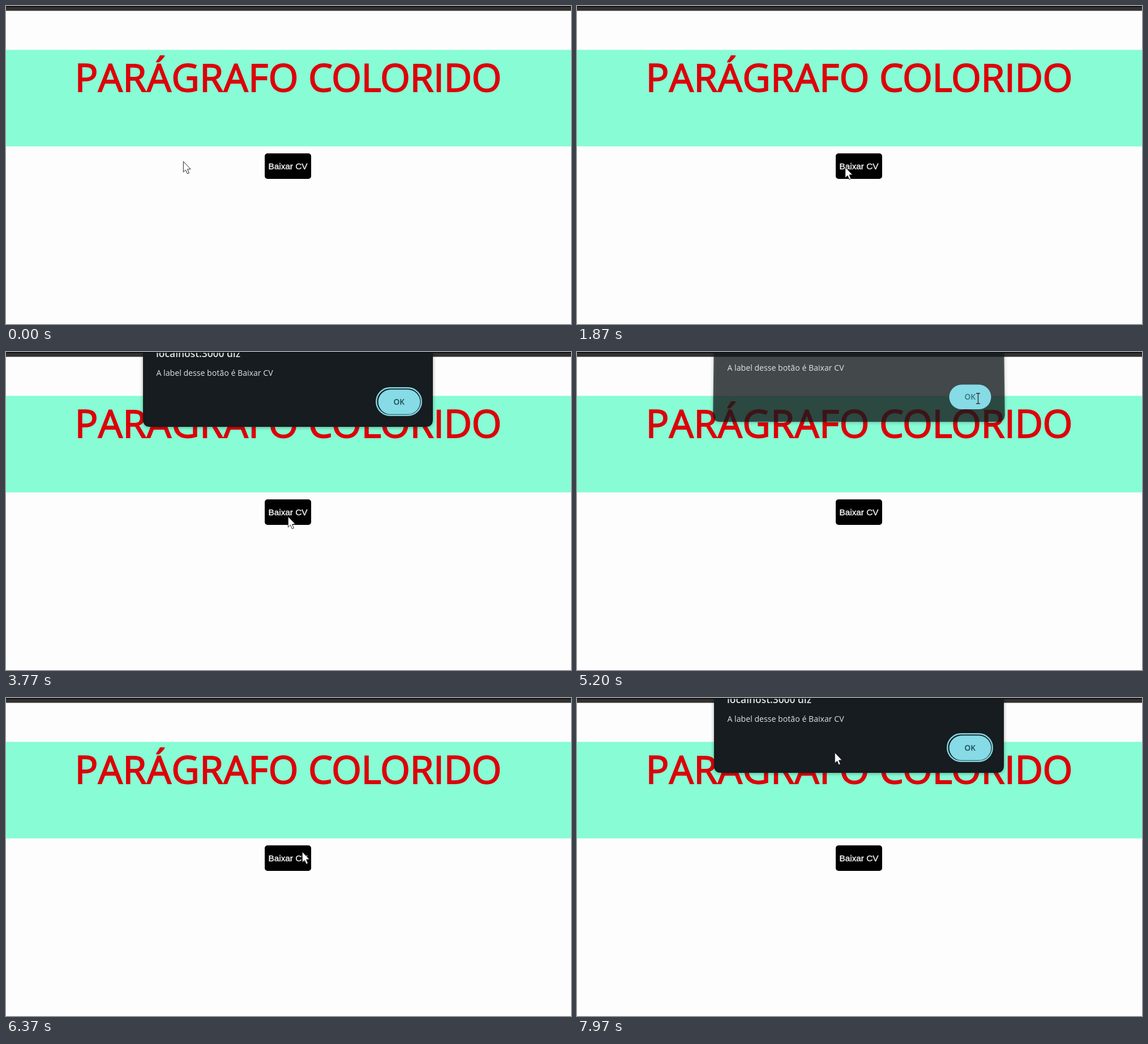
An HTML page with a canvas for the animation above (8000 ms loop, 998 px wide and 561 px high).

```html
<!DOCTYPE html>
<html lang="pt">
<head>
<meta charset="utf-8">
<title>Parágrafo colorido</title>
<style>
  html, body { margin: 0; width: 100%; height: 100%; overflow: hidden; background: #fcfdfc; }
  canvas { display: block; width: 100%; height: 100%; }
</style>
</head>
<body>
<canvas id="stage" width="998" height="561"></canvas>
<script>
const W = 998, H = 561, LOOP = 8000;
const SANS = '"Open Sans", "Noto Sans", sans-serif';
const ARIAL = '"Liberation Sans", sans-serif';
const ctx = document.getElementById('stage').getContext('2d');

// Pointer stops: time, x, y
const stops = [
  [0, 313, 274], [300, 311, 279], [870, 308, 230], [1250, 385, 250],
  [1670, 470, 283], [2500, 494, 290], [3000, 498, 294], [3330, 498, 294],
  [3500, 498, 290], [4250, 498, 290], [4900, 704, 82], [5550, 704, 82],
  [6200, 523, 271], [6780, 523, 271], [7430, 694, 86], [7560, 694, 86],
  [7820, 420, 108], [7970, 455, 96], [8000, 455, 96]
];
// Dialog visits: start of opening, start of closing
const visits = [[3480, 5140], [6560, 9000]];
const OPEN_MS = 180, CLOSE_MS = 210;

const clamp = v => Math.max(0, Math.min(1, v));
const smooth = v => v * v * (3 - 2 * v);
const lerp = (a, b, k) => a + (b - a) * k;

function pointerAt(t) {
  const i = Math.max(1, stops.findIndex(s => s[0] > t));
  const [t0, x0, y0] = stops[i - 1], [t1, x1, y1] = stops[i];
  const k = smooth(clamp((t - t0) / (t1 - t0)));
  return { x: lerp(x0, x1, k), y: lerp(y0, y1, k) };
}

function dialogAt(t) {
  for (const [start, end] of visits) {
    if (t < start || t > end + CLOSE_MS) continue;
    const closing = t >= end;
    const shown = closing ? 1 - (t - end) / CLOSE_MS : clamp((t - start) / OPEN_MS);
    return { shown, closing };
  }
  return null;
}

function text(str, x, y, font, color, { align = 'left', spacing = 0, weight = 0, kerning = 'auto' } = {}) {
  ctx.font = font;
  ctx.textAlign = align;
  ctx.letterSpacing = spacing + 'px';
  ctx.fontKerning = kerning;
  ctx.fillStyle = color;
  ctx.fillText(str, x, y);
  if (weight) {
    ctx.strokeStyle = color;
    ctx.lineWidth = weight;
    ctx.lineJoin = 'miter';
    ctx.miterLimit = 3;
    ctx.strokeText(str, x, y);
  }
}

function rect(x, y, w, h, color) {
  ctx.fillStyle = color;
  ctx.fillRect(x, y, w, h);
}

function box(x, y, w, h, r) {
  ctx.beginPath();
  ctx.roundRect(x, y, w, h, r);
}

function drawPage() {
  rect(0, 0, W, H, '#fcfdfc');
  rect(0, 77.4, W, 170.2, '#87fcd5');
  const font = '68px ' + SANS, red = '#dc0209';
  text('PARÁGRAFO', 121.5, 151.3, font, red, { spacing: 0.4, weight: 1.8, kerning: 'none' });
  text('COLORIDO', 534, 151.3, font, red, { spacing: -0.5, weight: 1.8 });
  box(457, 260, 82, 45, 5);
  ctx.fillStyle = '#000';
  ctx.fill();
  text('Baixar CV', 498, 288, '15.3px ' + ARIAL, '#f2f2f2', { align: 'center', weight: 0.4 });
}

function drawTopBar() {
  rect(0, 0, W, 8.5, '#343231');
  rect(0, 0, W, 1.5, '#080808');
}

// The panel widens a little at its foot while it tilts
function panelPath(spread) {
  const l = 242 - spread, r = 754 + spread, b = 132, c = 13;
  ctx.beginPath();
  ctx.moveTo(242, -20);
  ctx.lineTo(754, -20);
  ctx.lineTo(r, b - c);
  ctx.quadraticCurveTo(r, b, r - c, b);
  ctx.lineTo(l + c, b);
  ctx.quadraticCurveTo(l, b, l, b - c);
  ctx.closePath();
}

function drawOk(focused, shown) {
  if (focused) {
    box(654.2, 63.2, 79.6, 48.6, 24.3);
    ctx.strokeStyle = '#82d5e0';
    ctx.lineWidth = 2.4;
    ctx.stroke();
  }
  box(657.5, 66.3, 74, 43.5, 21.8);
  ctx.fillStyle = '#86dbe6';
  ctx.fill();
  ctx.globalAlpha *= shown;
  text('OK', 694.3, 93, '600 13.6px ' + SANS, '#174851', { align: 'center' });
}

function drawDialog({ shown, closing }) {
  const gone = 1 - shown;
  ctx.save();
  ctx.beginPath();
  ctx.rect(0, 1.5, W, H);
  ctx.clip();
  ctx.translate(0, -30 * gone);
  ctx.globalAlpha = clamp(shown * 2);
  ctx.save();
  ctx.globalAlpha *= 1 - gone * 0.95;
  ctx.shadowColor = 'rgba(0,0,0,.35)';
  ctx.shadowBlur = 6;
  ctx.shadowOffsetY = 1;
  panelPath(6 * gone);
  ctx.fillStyle = '#161c1f';
  ctx.fill();
  ctx.restore();
  text('localhost:3000 diz', 265, 9, '600 17.4px ' + SANS, '#e3e7e8');
  text('A label desse botão é Baixar CV', 265.5, 42, '14.15px ' + SANS, '#dfe4e5');
  drawOk(!closing, shown);
  ctx.restore();
}

function drawArrow(x, y) {
  const pts = [[0, 0], [0, 18.8], [4.2, 14.9], [7, 21.6], [10, 20.3], [7.2, 13.7], [12.8, 13.4]];
  ctx.beginPath();
  for (const [px, py] of pts) ctx.lineTo(x + 0.3 + px, y + 0.3 + py);
  ctx.closePath();
  ctx.fillStyle = '#fff';
  ctx.fill();
  ctx.strokeStyle = '#24242c';
  ctx.lineWidth = 1;
  ctx.lineJoin = 'round';
  ctx.stroke();
}

function drawBeam(x, y) {
  ctx.beginPath();
  for (const s of [-1, 1]) {
    ctx.moveTo(x - 3.5, y + 9 * s);
    ctx.lineTo(x + 3.5, y + 9 * s);
  }
  ctx.moveTo(x, y - 9);
  ctx.lineTo(x, y + 9);
  ctx.strokeStyle = '#3b2b30';
  ctx.lineWidth = 1.4;
  ctx.stroke();
}

function drawPointer(t, dialog) {
  const { x, y } = pointerAt(t);
  const overTitle = x > 125 && x < 872 && y > 78 && y < 172;
  if (overTitle && (!dialog || dialog.closing)) drawBeam(x + 4.5, y);
  else drawArrow(x, y);
}

function draw(t) {
  const dialog = dialogAt(t);
  drawPage();
  drawTopBar();
  if (dialog) drawDialog(dialog);
  drawPointer(t, dialog);
}

const begin = performance.now();
function tick() {
  draw((performance.now() - begin) % LOOP);
  requestAnimationFrame(tick);
}
tick();
</script>
</body>
</html>
```
